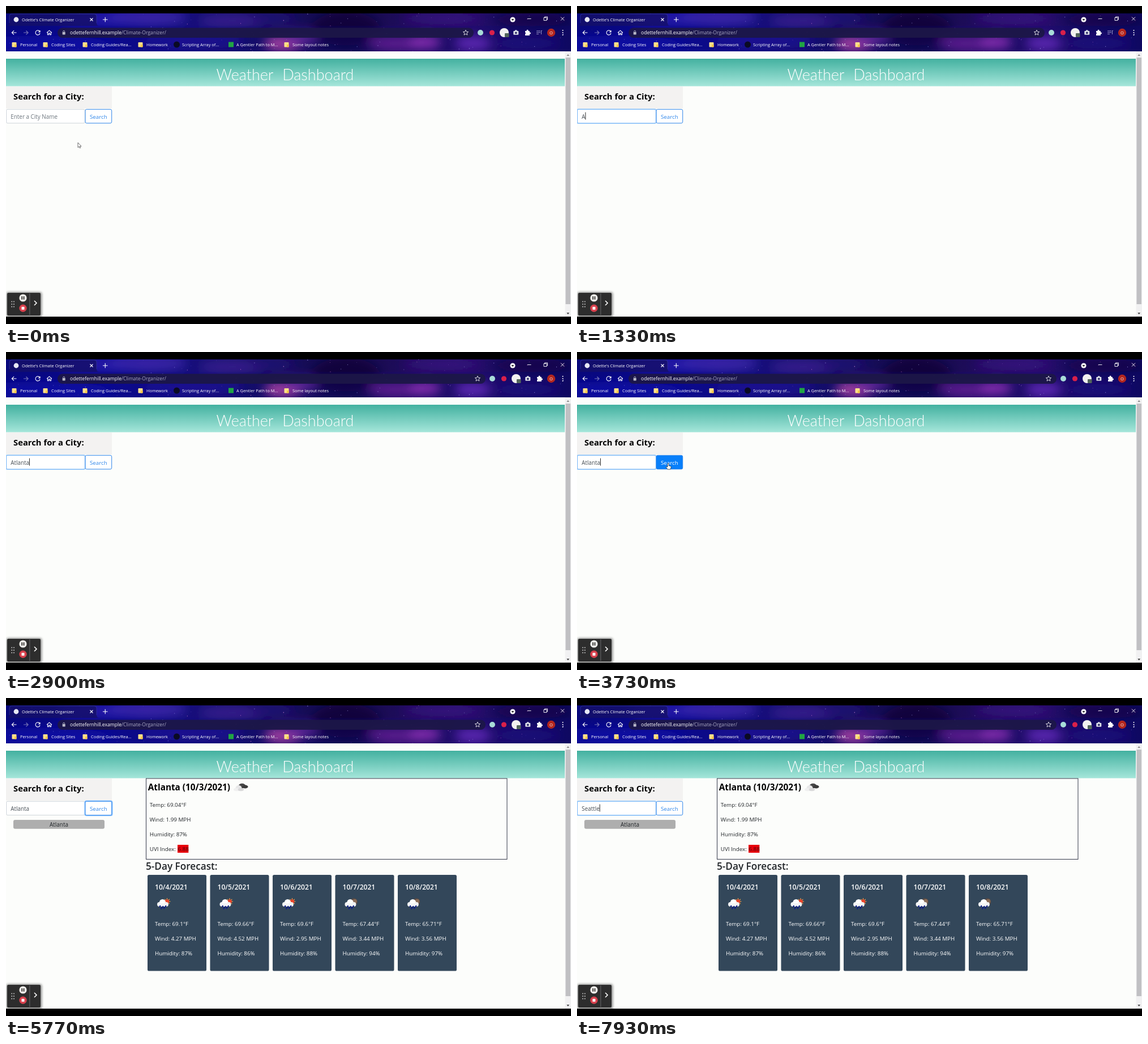
Animation of 998 by 561 pixels, one loop 8 s. Source, as an HTML page:

```html
<!DOCTYPE html>
<html lang="en">
<head>
<meta charset="utf-8">
<title>Weather Dashboard</title>
<style>
  html, body { margin: 0; width: 100%; height: 100%; overflow: hidden; background: #000; }
  svg { display: block; width: 100vw; height: 100vh; font-family: "Open Sans", "Noto Sans", sans-serif; }
  text { white-space: pre; }
</style>
</head>
<body>
<svg id="stage" viewBox="0 0 998 561"></svg>
<script>
const LOOP = 8000;
const INK = '#212529', BLUE = '#2f86ea';

// Markup helpers
const rect = (x, y, w, h, fill, more = '') =>
  `<rect x="${x}" y="${y}" width="${w}" height="${h}" fill="${fill}" ${more}/>`;
const circle = (x, y, r, fill, more = '') =>
  `<circle cx="${x}" cy="${y}" r="${r}" fill="${fill}" ${more}/>`;
const ellipse = (x, y, rx, ry, fill, more = '') =>
  `<ellipse cx="${x}" cy="${y}" rx="${rx}" ry="${ry}" fill="${fill}" ${more}/>`;
const text = (x, y, size, fill, content, more = '') =>
  `<text x="${x}" y="${y}" font-size="${size}" fill="${fill}" ${more}>${content}</text>`;
const line = (d, stroke = '#fff', width = 1.1, more = '') =>
  `<path d="${d}" fill="none" stroke="${stroke}" stroke-width="${width}" ${more}/>`;
const shape = (d, fill, more = '') => `<path d="${d}" fill="${fill}" ${more}/>`;
const group = (id, content, more = '') => `<g id="${id}" ${more}>${content}</g>`;
const at = (x, y, content) => `<g transform="translate(${x} ${y})">${content}</g>`;

function randomSource(seed) {
  return () => (seed = (seed * 16807) % 2147483647) / 2147483647;
}

const defs = `<defs>
  <linearGradient id="sky">
    <stop offset="0" stop-color="#08087c"/><stop offset=".2" stop-color="#0c0a90"/>
    <stop offset=".38" stop-color="#17106f"/><stop offset=".6" stop-color="#150a4c"/>
    <stop offset=".8" stop-color="#260e68"/><stop offset="1" stop-color="#10085c"/>
  </linearGradient>
  <linearGradient id="banner" x2="0" y2="1">
    <stop offset="0" stop-color="#43b1a0"/><stop offset="1" stop-color="#a5e6da"/>
  </linearGradient>
  <filter id="haze" x="-50%" y="-80%" width="200%" height="260%"><feGaussianBlur stdDeviation="9"/></filter>
  <filter id="soft" x="-20%" y="-20%" width="140%" height="140%"><feGaussianBlur stdDeviation="2"/></filter>
  <clipPath id="bar"><rect y="13" width="998" height="67"/></clipPath>
</defs>`;

function galaxy() {
  const random = randomSource(77);
  const clouds = [
    [60, 68, 130, 16, '#0b09b4', .8], [150, 22, 60, 12, '#3a2bbd', .6], [250, 20, 70, 14, '#4930b4', .7],
    [330, 62, 90, 14, '#2516a0', .7], [400, 26, 60, 12, '#4a2aa0', .6], [490, 66, 34, 14, '#d04fae', .9],
    [520, 58, 30, 12, '#7a2fa8', .8], [470, 22, 40, 10, '#241078', .8], [600, 40, 60, 30, '#0c0638', .8],
    [690, 66, 50, 14, '#8c2aa8', .7], [740, 64, 28, 12, '#b43cc8', .8], [825, 66, 32, 13, '#7e34d0', .8],
    [770, 22, 70, 10, '#3c1488', .7], [920, 66, 60, 10, '#220c88', .7], [930, 24, 70, 12, '#0c0644', .7]
  ];
  const glow = clouds.map(([x, y, rx, ry, color, alpha]) =>
    ellipse(x, y, rx, ry, color, `opacity="${alpha}"`)).join('');
  const stars = Array.from({ length: 150 }, () =>
    circle((random() * 998).toFixed(1), (13 + random() * 67).toFixed(1), (.25 + random() * .5).toFixed(2),
      random() < .3 ? '#f08ad8' : '#b9b4ff', `opacity="${(.3 + random() * .6).toFixed(2)}"`)).join('');
  return `<g clip-path="url(#bar)">${rect(0, 13, 998, 67, 'url(#sky)')}
    <g filter="url(#haze)">${glow}</g>${stars}</g>`;
}

function browserBar() {
  const folders = [[10, 'Personal'], [65, 'Coding Sites'], [135, 'Coding Guides/Rea...'], [233, 'Homework'],
    [296, 'Scripting Array of...'], [392, 'A Gentler Path to M...'], [491, 'Some layout notes']];
  const bookmarks = folders.map(([x, label], i) => {
    const icon = i === 4 ? circle(x + 5.5, 68, 5.5, '#0a0a23')
      : i === 5 ? rect(x + 1, 63.5, 9, 9, '#21a544')
      : rect(x + .5, 64, 8, 8.5, '#ffe08a', 'rx="1"') + rect(x + 5, 68, 3.5, 4.5, '#f7c948');
    return icon + text(x + 15, 70.8, 7.4, '#fff', label);
  }).join('');
  return rect(0, 35, 998, 45, '#0a087a', 'opacity=".18"')
    + shape('M1 35Q6 35 6 30V18Q6 14 10 14H156Q160 14 160 18V30Q160 35 165 35Z', '#141068', 'opacity=".8"')
    + line('M6 30V18Q6 14 10 14H156Q160 14 160 18V30', '#3c40a0', .6)
    + circle(18, 24, 4.4, '#e6e8f4')
    + text(28, 26.6, 7.4, '#fff', "Odette's Climate Organizer")
    + line('M148.5 21.5l5 5m0-5l-5 5M171 24h8.5m-4.25-4.25v8.5')
    + circle(895, 24, 4.6, '#f4f4f6') + shape('M892.6 23h4.8L895 26Z', '#222')
    + line('M921 22.5h6.5M950 20.5h5v5h-5zM951.5 20.5v-1.5h5v5h-1.5M980 19.5l6 6m0-6l-6 6', '#fff', .9)
    + line('M18.5 47H10.5M14 43.3L10.3 47l3.7 3.7M59.7 45.3A4 4 0 1 0 60 48M60 43v3h-3M72 47.2l4.5-4 4.5 4M73.5 46.5v4.2h2v-2.7h2v2.7h2v-4.2')
    + line('M31 47h8M35.5 43.3L39.2 47l-3.7 3.7', '#7774b4')
    + `<rect id="address" x="91" y="38.5" width="735" height="17.5" rx="8.7" fill="#1c1748" opacity=".94"/>`
    + rect(99.7, 46, 5, 4.4, '#b8b8c8', 'rx=".6"') + line('M100.8 46v-1.2a1.4 1.4 0 0 1 2.8 0V46', '#b8b8c8', .9)
    + text(113, 50.2, 8.6, '#fff', 'odettefernhill.example<tspan fill="#aaa9c4">/Climate-Organizer/</tspan>')
    + group('queue', line('M937 44h7m-7 2.7h7m-7 2.7h4M945.5 50v-6.5h1.5', '#a9a5d2', .9))
    + group('extensions',
      shape('M812 42.3l1.3 3 3.3.3-2.5 2.2.8 3.3-2.9-1.8-2.9 1.8.8-3.3-2.5-2.2 3.3-.3z', 'none', 'stroke="#fff" stroke-width=".8"')
      + circle(838, 47, 5, '#a8dcd8') + circle(858.5, 47, 4.6, '#d9204a')
      + circle(880, 47, 8, '#f1f1ef') + rect(881, 48, 7.5, 7, '#52665c', 'rx="1"')
      + rect(896.3, 44, 9, 6.8, '#dce0e8', 'rx="1"') + rect(899, 42.5, 3.6, 2, '#dce0e8') + circle(900.8, 47.4, 1.9, '#33306d')
      + shape('M917 44h2.6a1.6 1.6 0 1 1 3 0h2.2v2.5a1.6 1.6 0 1 1 0 3V52H917v-2.6a1.5 1.5 0 0 0 0-2.8z', '#fff'))
    + circle(963, 47, 7.2, '#b3261e') + text(963, 49.7, 7.6, '#fff', 'O', 'text-anchor="middle"')
    + [43, 47, 51].map(y => circle(983.5, y, 1, '#fff')).join('')
    + bookmarks;
}

function page() {
  return rect(0, 80, 998, 468, '#fcfdfb')
    + rect(987.5, 80, 10.5, 468, '#f1f1f2') + rect(988.5, 91, 8.5, 435, '#c0c0c3')
    + shape('M990.3 88l2.4-3 2.4 3z', '#888') + shape('M990.3 541l2.4 3 2.4-3z', '#444')
    + rect(0, 93, 987, 48.5, 'url(#banner)')
    + text(493, 131, 27, '#fff', 'Weather Dashboard', 'text-anchor="middle" font-weight="300" word-spacing="9" font-family="Lato, sans-serif"')
    + rect(0, 142, 187, 39, '#f3f2f1')
    + text(13, 165, 14.8, '#000', 'Search for a City:', 'font-weight="700"')
    + `<rect id="fieldRing" x="-1" y="181" width="141.5" height="27" rx="3" fill="#b6d9fb"/>`
    + `<rect id="field" x=".5" y="182.3" width="139" height="24.4" rx="2.5" fill="#fff"/>`
    + text(8.3, 198.5, 9.9, INK, '', 'id="entry"')
    + rect(0, 187.5, .9, 13, '#111', 'id="caret"')
    + `<rect id="buttonRing" x="138.5" y="180.7" width="50" height="27.6" rx="3.5" fill="#80bdff"/>`
    + `<rect id="button" x="140" y="182.3" width="46.7" height="24.4" rx="2.5" stroke="${BLUE}"/>`
    + text(163.3, 198.5, 9.8, BLUE, 'Search', 'id="buttonText" text-anchor="middle"');
}

function rainIcon(night) {
  const sun = night ? circle(16, -3.5, 6.3, '#594a43') + circle(17.5, -4.5, 3.8, '#8a6c58')
    : line('M17.5 -10v12M11.5 -4h12M13.2 -8.2l8.6 8.6M21.8 -8.2L13.2 .4', '#f6b04a', 1.1) + circle(17.5, -4, 3.8, '#e8452c');
  return sun
    + circle(4, 1, 4, '#f4f5f6') + circle(9.5, -2.5, 5.6, '#fff') + circle(16, 1, 3.9, '#f1f2f4') + rect(4, -1, 12, 6, '#f4f5f6')
    + [[5, 4.5], [10, 5.5], [15, 4.5], [7.5, 8], [12.5, 7.5]].map(([x, y]) => ellipse(x, y, 1.2, 1.9, '#0c1c86', `transform="rotate(25 ${x} ${y})"`)).join('');
}

function results() {
  const cards = [['10/4/2021', '69.1', '4.27', 87], ['10/5/2021', '69.66', '4.52', 86], ['10/6/2021', '69.6', '2.95', 88],
    ['10/7/2021', '67.44', '3.44', 94], ['10/8/2021', '65.71', '3.56', 97]];
  const readings = (x, y, fill, temp, wind, humidity) =>
    [`Temp: ${temp}°F`, `Wind: ${wind} MPH`, `Humidity: ${humidity}%`]
      .map((label, i) => text(x, y + 26 * i, 9.8, fill, label)).join('');
  return rect(13, 215, 161, 15.8, '#aeaeae', 'rx="3"') + text(93.5, 226.8, 9.9, INK, 'Atlanta', 'text-anchor="middle"')
    + rect(247.5, 142, 637.5, 142.5, 'none', 'stroke="#34384a"')
    + text(250.8, 162.8, 15.3, '#000', 'Atlanta (10/3/2021)', 'font-weight="700"')
    + at(402, 158, ellipse(15, -3, 6, 4.2, '#474747') + ellipse(20.5, -1.5, 5, 3, '#3a3a3a')
      + ellipse(9, 1, 5.5, 5, '#e7e7e8') + ellipse(5, 3.5, 5, 2.8, '#f0f0f0') + ellipse(13, 3.5, 5.3, 2.8, '#d9d9da'))
    + readings(253.8, 192, INK, '69.04', '1.99', 87)
    + text(253.8, 270, 9.8, INK, 'UVI Index:') + rect(303, 259, 19.3, 14, '#e8000b') + text(303.4, 270, 9.8, '#4a0508', '6.88')
    + text(247, 303, 17.2, INK, '5-Day Forecast:', 'font-weight="600"')
    + cards.map(([date, ...values], i) => at(250 + 110.5 * i, 0,
      rect(0, 312, 104, 169.5, '#33475a', 'rx="2.6"')
      + text(13, 337.6, 12.1, '#fff', date, 'font-weight="600"')
      + at(17, 363, rainIcon(i > 2))
      + readings(13, 402.4, '#fff', ...values))).join('');
}

function recorder() {
  const grip = [521.5, 526, 530.5].flatMap(y => [10.3, 14].map(x => circle(x, y, 1, '#c9c9c9'))).join('');
  return rect(1, 505, 62, 43, '#000', 'rx="3" opacity=".5" filter="url(#soft)"')
    + rect(2, 506, 59, 40, '#2d2d2d', 'rx="2"') + grip
    + circle(30, 515, 6.6, '#f4f2ec') + rect(27.4, 512.2, 1.7, 5.6, '#222') + rect(30.7, 512.2, 1.7, 5.6, '#222')
    + circle(30, 533.2, 6.6, '#d8404c') + rect(27.5, 530.7, 5, 5, '#fff')
    + rect(41.5, 507, .8, 38, '#77777a') + line('M50 520l4 4-4 4', '#fff', 1.6);
}

const pointers = group('arrow', shape('M0 0V8.6L2 6.9 3.4 9.7 4.7 9.1 3.4 6.4H6Z', '#fff', 'stroke="#333" stroke-width=".7"'))
  + group('beam', line('M-1.5 -5H1.5M0 -5V5M-1.5 5H1.5', '#333', .7))
  + group('hand', shape('M-1 1Q0 -1 1 1V4.5L4.5 5.5Q5.5 6 5 8L4 11H-1L-3.8 7Q-3.5 5.5 -1 7Z', '#fff', 'stroke="#222" stroke-width=".7"'));

document.getElementById('stage').innerHTML = defs + rect(0, 0, 998, 561, '#000')
  + galaxy() + browserBar() + page() + group('results', results()) + recorder() + group('pointer', pointers);

const part = id => document.getElementById(id);
const set = (id, name, value) => part(id).setAttribute(name, value);
const show = (id, visible) => set(id, 'visibility', visible ? 'inherit' : 'hidden');

const TOOLBAR_SHIFT = 2050, RESULTS = 4100, CLEARED = 6300;
const first = { word: 'Atlanta', start: 1250, step: 200 };
const second = { word: 'Seattle', start: 6850, step: 150 };
const pointerPath = [[0, 127, 241], [350, 127, 241], [750, 96, 196], [3000, 96, 196], [3650, 161, 196], [4800, 161, 196], [5250, 70, 196]];

function typed({ word, start, step }, t) {
  return word.slice(0, Math.max(0, Math.floor((t - start) / step) + 1));
}

function pointerAt(t) {
  const next = pointerPath.findIndex(key => key[0] > t);
  if (next < 0) return pointerPath.at(-1).slice(1);
  const [t0, x0, y0] = pointerPath[next - 1], [t1, x1, y1] = pointerPath[next];
  const u = (t - t0) / (t1 - t0), eased = u * u * (3 - 2 * u);
  return [x0 + (x1 - x0) * eased, y0 + (y1 - y0) * eased];
}

function caretVisible(t, focusTime) {
  const run = t < CLEARED ? first : second;
  const lastKey = run.start + run.step * Math.min(run.word.length - 1, Math.floor((t - run.start) / run.step));
  const since = t - (t >= run.start && t < 5000 || t >= second.start ? lastKey : t >= CLEARED ? CLEARED : focusTime);
  return since % 1060 < 530;
}

function draw(t) {
  const shift = t >= TOOLBAR_SHIFT ? 21 : 0;
  set('address', 'width', 735 + shift);
  set('extensions', 'transform', `translate(${shift} 0)`);
  show('queue', !shift);

  const [x, y] = pointerAt(t);
  const overButton = x > 140 && y > 182 && y < 207;
  const overField = x <= 140 && y > 182 && y < 207;
  set('pointer', 'transform', `translate(${x} ${y})`);
  show('pointer', t < 900 || t > 3000 && t < 5400);
  show('hand', overButton);
  show('beam', overField);
  show('arrow', !overButton && !overField);

  const buttonFocus = t >= 3900 && t < 5950;
  const fieldFocus = t >= 850 && !buttonFocus;
  show('fieldRing', fieldFocus);
  set('field', 'stroke', fieldFocus ? '#73b3f5' : '#ced4da');
  show('buttonRing', buttonFocus);
  set('button', 'fill', overButton ? '#087ffa' : '#fff');
  set('buttonText', 'fill', overButton ? '#fff' : BLUE);

  const value = typed(t < CLEARED ? first : second, t);
  const entry = part('entry');
  entry.textContent = value || 'Enter a City Name';
  set('entry', 'fill', value ? '#495057' : '#6c757d');
  show('caret', fieldFocus && caretVisible(t, t < 5000 ? 850 : 5950));
  set('caret', 'x', 8.3 + (value ? entry.getComputedTextLength() : 0));
  show('results', t >= RESULTS);
}

function tick(now) {
  draw(now % LOOP);
  requestAnimationFrame(tick);
}
requestAnimationFrame(tick);
</script>
</body>
</html>
```
